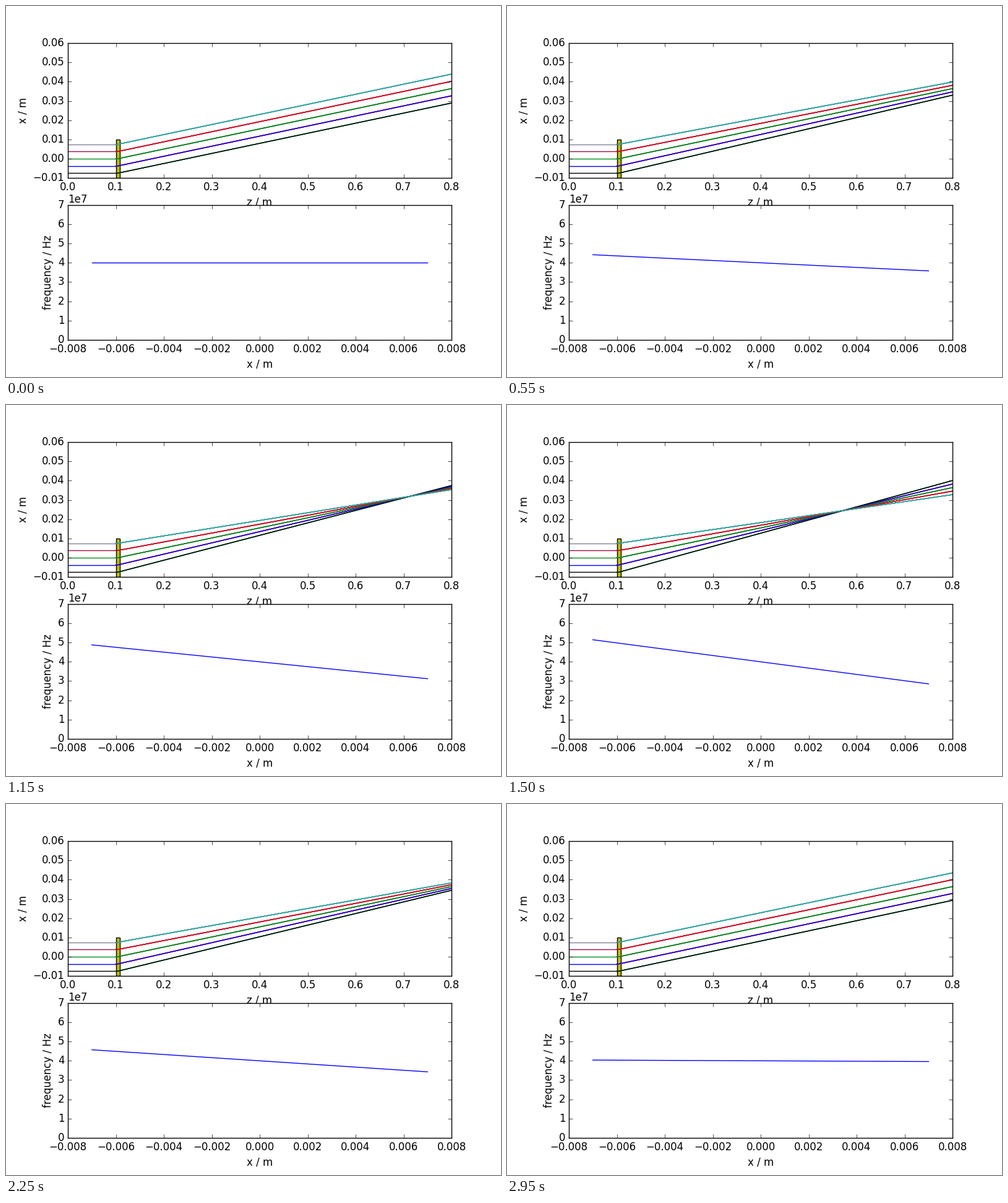
These frames come from a looping animation (800x600 px, 3000 ms). A matplotlib script:

```python
import numpy as np
import matplotlib.pyplot as plt
from matplotlib.animation import FuncAnimation
from matplotlib.patches import Rectangle

FRAMES, INTERVAL = 60, 50
F0 = 4e7               # centre frequency, Hz
CHIRP_STEP = 5.45e7    # chirp added per frame, Hz/m
DEFLECT = 0.0523 / F0  # rad per Hz
Z_IN, Z_BEND, Z_END = 0.1, 0.104, 0.8

CYCLE = "bgrcmyk"
PASSES = 5
IN_COLORS = ["k", "b", (0.04, 0.56, 0.14), (0.66, 0.04, 0.26), (0.5, 0.5, 0.6)]

plt.style.use("classic")
fig, (top, bottom) = plt.subplots(2, 1, figsize=(8, 6), dpi=100, facecolor="w")

top.set(xlim=(0, 0.8), ylim=(-0.01, 0.06), xlabel="z / m", ylabel="x / m")
bottom.set(xlim=(-0.008, 0.008), ylim=(0, 7e7),
           xlabel="x / m", ylabel="frequency / Hz")

top.add_patch(Rectangle((Z_IN, -0.01), 0.008, 0.02, fc="y", ec="k"))

x_rays = np.linspace(-0.0075, 0.0075, 5)
x_cell = np.linspace(-0.007, 0.007, 50)

for x, color in zip(x_rays, IN_COLORS):
    top.plot([0, Z_IN], [x, x], color=color)

# Each ray is plotted several times while the colour cycle runs on.
rays = []
for p in range(PASSES):
    for i in range(len(x_rays)):
        color = CYCLE[(p * len(x_rays) + i) % len(CYCLE)]
        line, = top.plot([], [], color=color)
        rays.append((line, x_rays[i]))

freq_line, = bottom.plot([], [], "b")


def frequency(x, chirp):
    return F0 - chirp * x


def update(n):
    chirp = CHIRP_STEP * min(n, FRAMES - n)
    for line, x in rays:
        x_end = x + DEFLECT * frequency(x, chirp) * (Z_END - Z_BEND)
        line.set_data([Z_IN, Z_BEND, Z_END], [x, x, x_end])
    freq_line.set_data(x_cell, frequency(x_cell, chirp))
    return [line for line, _ in rays] + [freq_line]


anim = FuncAnimation(fig, update, frames=FRAMES, interval=INTERVAL,
                     init_func=lambda: update(0), repeat=True, repeat_delay=0)
plt.show()
```
